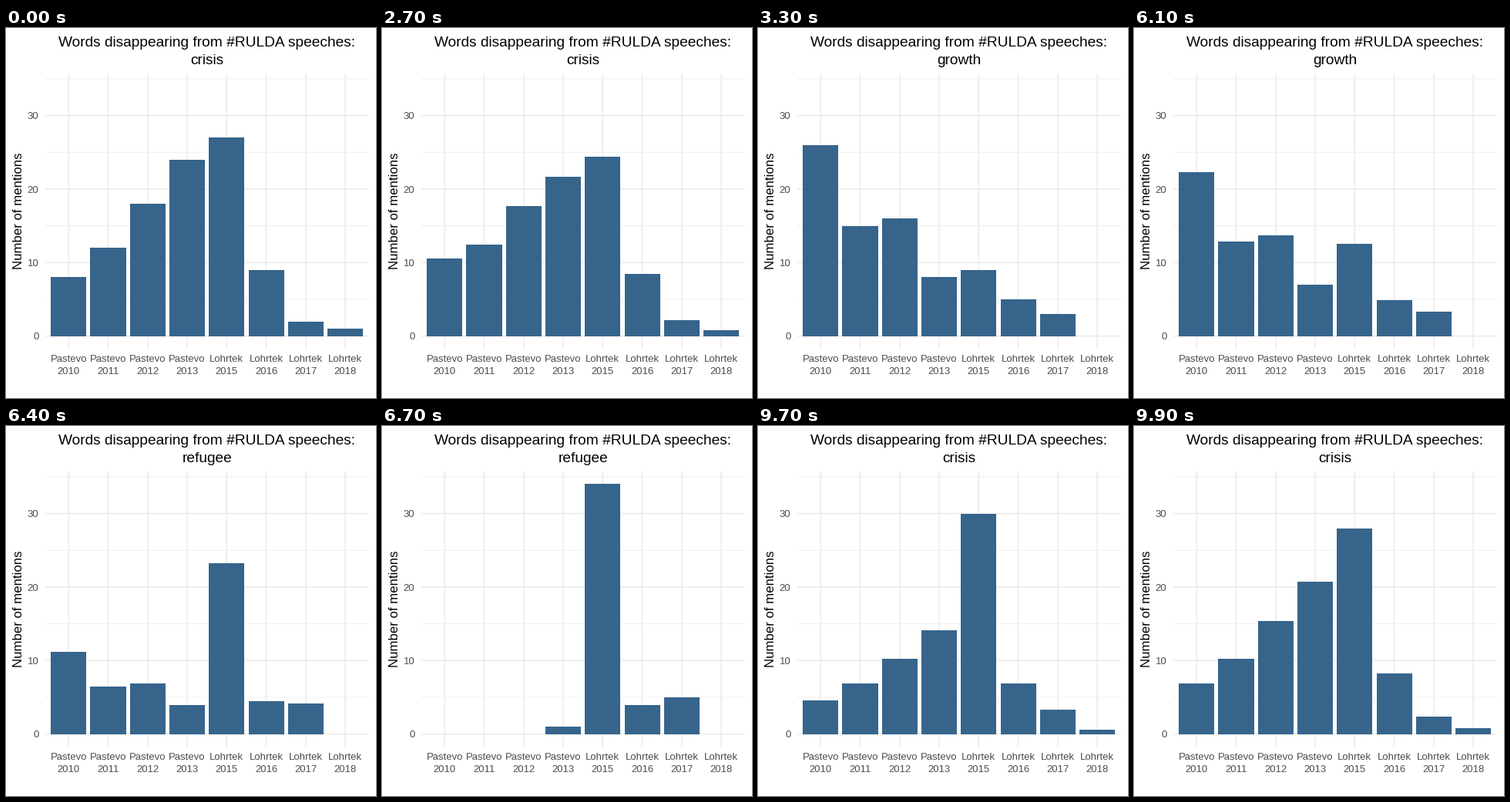
A matplotlib script that plays this animation: 480x480 px, repeating every 10000 ms.

```python
import numpy as np
import matplotlib.pyplot as plt
from matplotlib.animation import FuncAnimation

plt.rcParams["font.family"] = "Liberation Sans"

SIZE, DPI = 480, 96
PT = 72 / DPI  # points per pixel
FRAMES, STEPS = 100, 7
BAR, GRID, TICK = "#36648B", "#EBEBEB", "#4D4D4D"

WORDS = ["crisis", "growth", "refugee"]
COUNTS = np.array([
    [8, 12, 18, 24, 27, 9, 2, 1],
    [26, 15, 16, 8, 9, 5, 3, 0],
    [0, 0, 0, 1, 34, 4, 5, 0],
])
STARTS = [26, 60, 93]  # last still frame before each transition
SPEAKERS = ["Pastevo"] * 4 + ["Lohrtek"] * 4
YEARS = [2010, 2011, 2012, 2013, 2015, 2016, 2017, 2018]

LEFT, RIGHT, TOP, BOTTOM = 50.53, 470.85, 59, 416
ZERO, UNIT = 399.7, 9.538  # pixel row of zero, pixels per mention

fig = plt.figure(figsize=(SIZE / DPI, SIZE / DPI), dpi=DPI, facecolor="white")
ax = fig.add_axes([LEFT / SIZE, 1 - BOTTOM / SIZE,
                   (RIGHT - LEFT) / SIZE, (BOTTOM - TOP) / SIZE])
ax.set_xlim(0.4, 8.6)
ax.set_ylim((ZERO - BOTTOM) / UNIT, (ZERO - TOP) / UNIT)
ax.axis("off")


def label(x, y, text, size, color="black", ha="center", **kw):
    return fig.text(x / SIZE, 1 - y / SIZE, text, fontsize=size * PT,
                    color=color, ha=ha, va="baseline", **kw)


def row(value):
    return ZERO - value * UNIT


def column(i):
    return LEFT + (i + 0.6) * (RIGHT - LEFT) / 8.2


for v in range(5, 36, 10):
    ax.axhline(v, color=GRID, lw=0.78 * PT, snap=False, zorder=0)
for v in range(0, 31, 10):
    ax.axhline(v, color=GRID, lw=1.55 * PT, snap=False, zorder=1)
    label(42.5, row(v) + 4.6, str(v), 13.2, TICK, ha="right")
for i, (name, year) in enumerate(zip(SPEAKERS, YEARS)):
    ax.axvline(i + 1, color=GRID, lw=1.55 * PT, snap=False, zorder=1)
    label(column(i), 433, name, 13.1, TICK)
    label(column(i), 449, str(year), 13.1, TICK)

bars = ax.bar(np.arange(1, 9), COUNTS[0], width=0.9, color=BAR, lw=0, zorder=2)

label(261, 24, "Words disappearing from #RULDA speeches:", 19.1)
word = label(261, 47, WORDS[0], 19.1)
label(21, 237.5, "Number of mentions", 16.8, rotation=90, rotation_mode="anchor")


def update(frame):
    state, p = 0, 0.0
    for k, start in enumerate(STARTS):
        if frame > start:
            state, p = k, min((frame - start) / STEPS, 1)
    after = (state + 1) % len(WORDS)
    heights = (1 - p) * COUNTS[state] + p * COUNTS[after]
    for bar, h in zip(bars, heights):
        bar.set_height(h)
    word.set_text(WORDS[after if p > 0.5 else state])
    return [*bars, word]


anim = FuncAnimation(fig, update, frames=FRAMES, interval=100,
                     repeat=True, repeat_delay=0, blit=False)
plt.show()
```
